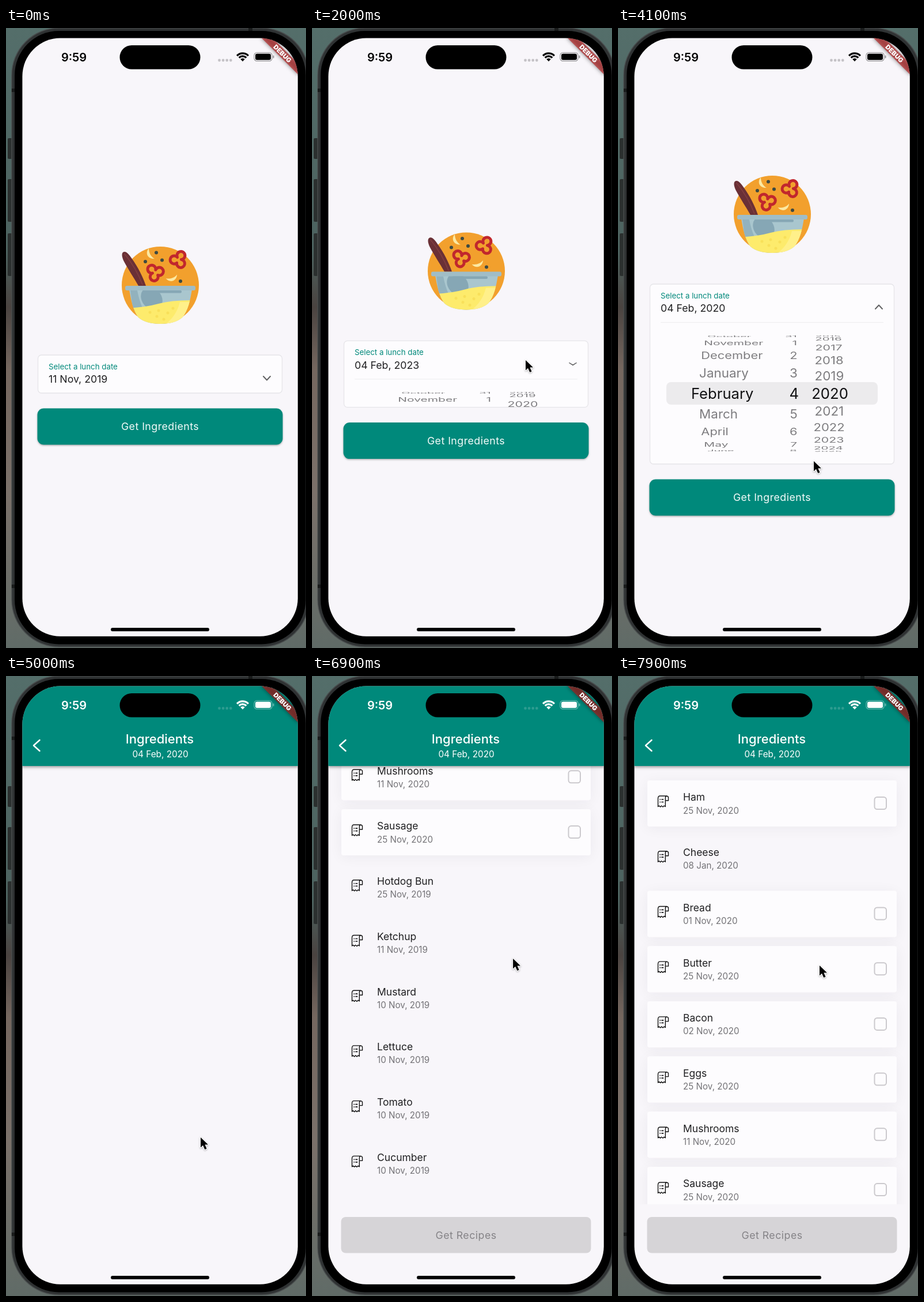
These frames come from a looping animation (521x1075 px, 8 s). An HTML page with a canvas:

```html
<!DOCTYPE html>
<html lang="en">
<head>
<meta charset="utf-8">
<title>Lunch date picker</title>
<style>
html, body { margin: 0; width: 100%; height: 100%; overflow: hidden; background: #5b6b67; }
canvas { display: block; width: 521px; height: 1075px; }
</style>
</head>
<body>
<canvas id="stage"></canvas>
<script>
const W = 521, H = 1075, LOOP = 8000;
const TEAL = '#00897b', PAGE = '#f8f6fa', CARD = '#fdfcfe', INK = '#1f1f21';
const MONTHS = ['January', 'February', 'March', 'April', 'May', 'June', 'July',
  'August', 'September', 'October', 'November', 'December'];
const FOODS = [
  ['Ham', '25 Nov, 2020'], ['Cheese', '08 Jan, 2020'], ['Bread', '01 Nov, 2020'],
  ['Butter', '25 Nov, 2020'], ['Bacon', '02 Nov, 2020'], ['Eggs', '25 Nov, 2020'],
  ['Mushrooms', '11 Nov, 2020'], ['Sausage', '25 Nov, 2020'], ['Hotdog Bun', '25 Nov, 2019'],
  ['Ketchup', '11 Nov, 2019'], ['Mustard', '10 Nov, 2019'], ['Lettuce', '10 Nov, 2019'],
  ['Tomato', '10 Nov, 2019'], ['Cucumber', '10 Nov, 2019'], ['Beetroot', '10 Nov, 2019'],
  ['Salad Dressing', '06 Nov, 2019']
].map(([name, date], i) => ({ name, date, fresh: i !== 1 && i < 8 }));

// [time, value...] points
const FADE = [[0, 0], [100, .5], [300, 1], [800, 1], [1000, 0]];
const EXPAND = [[1900, 0], [2000, .2], [2100, .6], [2200, .9], [2300, 1]];
const YEAR = [[2700, 2023], [2900, 2022.3], [3200, 2020.6], [3500, 2020]];
const SLIDE = [[4400, 0], [4500, .35], [4600, .7], [4700, .88], [4800, .96], [4900, 1]];
const SCROLL = [[6200, 0], [6400, 110], [6700, 480], [6900, 620], [7100, 650],
  [7300, 457], [7500, 170], [7700, 40], [7900, 0]];
const POINTER = [[1600, 530, 760], [1900, 371, 576], [2700, 371, 576], [3200, 350, 690],
  [3600, 344, 705], [4100, 340, 751], [4300, 338, 800], [5200, 338, 800], [6100, 369, 672],
  [6200, 369, 672], [6500, 352, 490], [7050, 348, 490], [7300, 344, 628], [7450, 345, 635],
  [7800, 350, 502]];

const BOWL = 'M214 453H323C320 472 316 490 306 502Q293 513 268 513Q243 513 230 502C221 490 217 472 214 453Z';

const canvas = document.getElementById('stage');
const ctx = canvas.getContext('2d');
const dpr = window.devicePixelRatio || 1;
canvas.width = W * dpr;
canvas.height = H * dpr;

function track(points, t) {
  if (t <= points[0][0]) return points[0].slice(1);
  for (let i = 1; i < points.length; i++) {
    const a = points[i - 1], b = points[i];
    if (t < b[0]) {
      const k = (t - a[0]) / (b[0] - a[0]);
      return a.slice(1).map((v, j) => v + (b[j + 1] - v) * k);
    }
  }
  return points[points.length - 1].slice(1);
}

function layer(draw, x = 0, y = 0) {
  ctx.save();
  ctx.translate(x, y);
  draw();
  ctx.restore();
}

function clipBox(x, y, w, h, r = 0) {
  ctx.beginPath();
  ctx.roundRect(x, y, w, h, r);
  ctx.clip();
}

function box(x, y, w, h, r, fill, stroke, lw = 1) {
  ctx.beginPath();
  ctx.roundRect(x, y, w, h, r);
  if (fill) { ctx.fillStyle = fill; ctx.fill(); }
  if (stroke) { ctx.strokeStyle = stroke; ctx.lineWidth = lw; ctx.stroke(); }
}

function shadowBox(x, y, w, h, r, fill, color, blur, dy) {
  layer(() => {
    ctx.shadowColor = color;
    ctx.shadowBlur = blur * dpr;
    ctx.shadowOffsetY = dy * dpr;
    box(x, y, w, h, r, fill);
  });
}

function dot(x, y, r, fill) {
  oval(x, y, r, r, 0, fill);
}

function oval(x, y, rx, ry, turn, fill) {
  ctx.beginPath();
  ctx.ellipse(x, y, rx, ry, turn, 0, 7);
  ctx.fillStyle = fill;
  ctx.fill();
}

function shape(d, fill, stroke, lw = 1) {
  const p = new Path2D(d);
  if (fill) { ctx.fillStyle = fill; ctx.fill(p); }
  if (stroke) {
    ctx.strokeStyle = stroke;
    ctx.lineWidth = lw;
    ctx.lineCap = ctx.lineJoin = 'round';
    ctx.stroke(p);
  }
}

// y is the middle of the capitals
function text(s, x, y, size, fill, { align = 'left', weight = 400, gap = 0 } = {}) {
  ctx.font = `${weight} ${size}px Inter, sans-serif`;
  ctx.letterSpacing = gap + 'px';
  ctx.textAlign = align;
  ctx.textBaseline = 'alphabetic';
  ctx.fillStyle = fill;
  ctx.fillText(s, x, y + size * .364);
}

function mix(a, b, k) {
  return `rgb(${a.map((v, i) => Math.round(v + (b[i] - v) * k)).join()})`;
}

function phone() {
  const g = ctx.createLinearGradient(0, 0, 0, H);
  [[0, '#546e6a'], [.36, '#4c625f'], [.45, '#4a4340'], [.55, '#75675f'],
    [.75, '#7b716a'], [1, '#606b67']].forEach(s => g.addColorStop(...s));
  ctx.fillStyle = g;
  ctx.fillRect(0, 0, W, H);
  [[191, 36], [262, 74], [356, 74]].forEach(([y, h]) => box(3, y, 9, h, 2, '#2b302f'));
  box(10, 0, 516, 1073, 82, '#2f3233', '#494d4e', 1.5);
  box(15, 5, 505.5, 1063.5, 77, '#000');
  ctx.fillStyle = '#191b1b';
  [105, 965].forEach(y => ctx.fillRect(10, y, 5, 6));
  ctx.fillRect(421, 0, 7, 5);
}

function pepper(x, y, turn) {
  layer(() => {
    ctx.rotate(turn);
    shape('M-4-4A7 7 0 1 1 4-4A7 7 0 1 1 0 5A7 7 0 1 1-4-4Z', null, '#c1272d', 5);
  }, x, y);
}

function moon(x, y, turn) {
  layer(() => {
    ctx.rotate(turn);
    shape('M-3-10C-10-2-5 9 7 8C1 5-3-2-3-10Z', '#fce9a2');
  }, x, y);
}

function bowl() {
  dot(268, 446, 67, '#f2a02d');
  pepper(260, 425, -.8);
  pepper(299, 403, .52);
  moon(251, 392, 0);
  moon(288, 433, -1.4);
  [[261, 389.5], [242, 405], [271, 402.5], [303, 439]].forEach(([x, y]) => dot(x, y, 3, '#3d4a42'));
  shape('M203 389C208 385 214 393 218 399C229 414 238 432 243 447L230 447C222 433 212 418 205 405C202 399 200 392 203 389Z', '#6a3036');
  shape('M206 392C216 404 229 424 237 445', null, '#823e40', 1.5);
  layer(() => {
    ctx.clip(new Path2D(BOWL));
    ctx.fillStyle = '#a9c6ce';
    ctx.fillRect(205, 450, 130, 65);
    shape('M216 455H228Q231 472 237 485H220Z', '#92b2be');
    oval(253, 469, 17, 21, -.7, '#86a7b5');
    shape('M205 486Q240 485 265 478T335 472V515H205Z', '#fdeb6c');
    shape('M302 475H325L300 515H275Q296 500 302 475Z', '#fff08a');
    [[250, 493], [265, 490], [262, 500], [281, 494], [290, 486], [274, 505]]
      .forEach(([x, y]) => dot(x, y, 2.5, '#f8e05a'));
  });
  box(207, 447, 122, 8, 3, '#a0bdc7');
  box(243, 455, 62, 4.5, 2, '#86a7b5');
}

function wheel(label, pos, step, { x, bigX, align, pivot }) {
  const mid = 634, base = Math.round(pos);
  for (const big of [false, true]) {
    ctx.save();
    ctx.beginPath();
    if (!big) ctx.rect(55, 500, 425, 270);
    ctx.rect(84, 614, 367, 39);
    ctx.clip('evenodd');
    for (let i = base - 5; i <= base + 5; i++) {
      const a = (i - pos) * step;
      if (Math.abs(a) > 1.56) continue;
      const c = Math.cos(a), s = 1 - .138 * (1 - c), m = big ? 1.135 : 1;
      layer(() => {
        ctx.scale(s * m, Math.max(c, .08) * m);
        text(label(i), 0, 0, 22.6, big ? '#121214' : '#7d7c7f', { align });
      }, big ? bigX : pivot + (x - pivot) * s, mid + 100 * Math.sin(a) * m);
    }
    ctx.restore();
  }
}

function picker(year) {
  ctx.fillStyle = '#ededef';
  ctx.fillRect(74, 510, 387, 1);
  box(84, 614, 367, 39, 8, '#ecebed');
  wheel(i => MONTHS[(i + 12) % 12], 1, .36, { x: 140, bigX: 127, align: 'left', pivot: 267 });
  wheel(i => String((i + 30) % 31 + 1), 4, .36, { x: 312, bigX: 314, align: 'right', pivot: 300 });
  wheel(String, year, .31, { x: 367, bigX: 368, align: 'center', pivot: 350 });
}

function datePage(t) {
  const [e] = track(EXPAND, t), [off] = track(FADE, t), [year] = track(YEAR, t);
  const top = 567 - 123 * e, tall = 66 + 246 * e, btn = top + tall + 26.5;
  const date = t < 100 ? '11 Nov, 2019' : `04 Feb, ${Math.round(year)}`;
  ctx.fillStyle = PAGE;
  ctx.fillRect(28, 17, 480, 1040);
  layer(bowl, 0, -123 * e);
  box(55.5, top, 424, tall, 6, CARD, mix([230, 229, 233], [240, 239, 242], off), 1.3);
  text('Select a lunch date', 74, top + 20, 13.3, mix([0, 137, 123], [156, 154, 158], off));
  text(date, 74, top + 42, 17.7, mix([31, 31, 33], [117, 116, 120], off));
  layer(() => {
    ctx.scale(1, 1 - 2 * e);
    shape('M-6-3L0 3.5L6-3', null, mix([100, 100, 102], [150, 150, 152], off), 2);
  }, 453, top + 40);
  if (e) layer(() => {
    clipBox(56, top, 423, tall, 6);
    ctx.translate(0, top - 444);
    picker(year);
  });
  shadowBox(54.5, btn, 426, 63, 11, mix([0, 137, 123], [86, 179, 168], off), 'rgba(0,0,0,.3)', 3, 1.5);
  text('Get Ingredients', 267.5, btn + 31.5, 17.8, '#f4fbfa', { align: 'center', gap: .45 });
}

function receipt() {
  shape('M4 0H15.5Q18.5 .5 18.5 3V8H13.3M16 0Q13.3 .5 13.3 3V18.5L11 17L9 19L6.5 17L4.5 19L2.5 17L.5 18.5V4Q.5 0 4 0Z', null, '#111', 1.4);
  shape('M4 6H4.2M7 6H9.5M4 10.5H4.2M7 10.5H9.5', null, '#111', 1.7);
}

function list(scroll) {
  clipBox(28, 156, 480, 760);
  const rows = FOODS.map((food, i) => ({ ...food, y: 181 + 95.72 * i - scroll }))
    .filter(r => r.y > 40 && r.y < 960);
  const cards = rows.filter(r => r.fresh);
  cards.forEach(r => shadowBox(51, r.y, 433, 80, 4, CARD, 'rgba(30,40,50,.055)', 24, 3));
  cards.forEach(r => {
    box(51, r.y, 433, 80, 4, CARD);
    box(445.5, r.y + 29, 20.5, 21, 4.5, null, '#cbc9cd', 2);
  });
  rows.forEach(r => {
    layer(receipt, 69, r.y + 27);
    text(r.name, 113, r.y + 29, 17.5, INK);
    text(r.date, 113, r.y + 52, 15.2, '#737276');
  });
}

function listPage(t) {
  ctx.fillStyle = PAGE;
  ctx.fillRect(28, 17, 480, 1040);
  if (t >= 5400) {
    layer(() => list(track(SCROLL, t)[0]));
    box(50.5, 938, 434, 62.5, 8, '#d6d4d7');
    text('Get Recipes', 267.5, 970, 17.8, '#858387', { align: 'center', gap: .45 });
  }
  shadowBox(28, 17, 480, 139, 0, TEAL, 'rgba(0,0,0,.4)', 5, 2);
  shape('M58.5 111L48 120.5L58.5 130', null, '#fff', 2.5);
  text('Ingredients', 267, 109, 22, '#fff', { align: 'center', weight: 500 });
  text('04 Feb, 2020', 268, 135, 15.3, '#fff', { align: 'center' });
}

function statusBar(light) {
  const ink = light ? '#fff' : '#000';
  text('9:59', 118, 51, 20, ink, { align: 'center', weight: 600 });
  box(197.5, 30, 140, 41.5, 20.7, '#000');
  for (let i = 0; i < 4; i++) dot(370.5 + 6.6 * i, 56, 2.4, light ? '#2d9c90' : '#c5c3c7');
  ctx.strokeStyle = ink;
  ctx.lineCap = 'butt';
  ctx.lineWidth = 3.2;
  for (const r of [13.6, 8.6]) {
    ctx.beginPath();
    ctx.arc(411, 57.5, r, -Math.PI * .76, -Math.PI * .24);
    ctx.stroke();
  }
  shape('M411 58L407.2 54Q411 51 414.8 54Z', ink);
  ctx.globalAlpha = .4;
  box(431, 42.5, 31, 15, 5, null, ink, 1.2);
  box(463.5, 47.5, 2, 5, 1, ink);
  ctx.globalAlpha = 1;
  box(433, 44.5, 27, 11, 3.2, ink);
}

function ribbon() {
  layer(() => {
    ctx.rotate(Math.PI / 4);
    ctx.save();
    ctx.shadowColor = 'rgba(0,0,0,.5)';
    ctx.shadowBlur = 7 * dpr;
    ctx.shadowOffsetX = 1000 * dpr;
    const shift = 1000 * Math.SQRT1_2;
    ctx.fillRect(-45 - shift, 31.2 + shift, 90, 13.4);
    ctx.restore();
    ctx.fillStyle = 'rgba(183,28,28,.627)';
    ctx.fillRect(-45, 31.2, 90, 13.4);
    text('DEBUG', 0, 37.9, 11.2, '#fff', { align: 'center', weight: 900 });
  }, 507, 17.5);
}

function arrow(x, y) {
  layer(() => {
    ctx.shadowColor = 'rgba(0,0,0,.3)';
    ctx.shadowBlur = 3 * dpr;
    ctx.shadowOffsetY = dpr;
    const d = 'M0 0V17.5L4 13.8L7.3 21L10.6 19.5L7.4 12.6H13Z';
    shape(d, null, '#fff', 2.4);
    ctx.shadowColor = 'transparent';
    shape(d, '#000');
  }, x, y);
}

function draw(t) {
  ctx.setTransform(dpr, 0, 0, dpr, 0, 0);
  phone();
  const [slide] = track(SLIDE, t);
  layer(() => {
    clipBox(28.4, 17.6, 478.4, 1037.2, 66);
    if (slide < 1) layer(() => datePage(t), -160 * slide);
    if (slide > 0) layer(() => listPage(t), 479 * (1 - slide));
    statusBar(slide > .5);
    ribbon();
    box(182, 1040, 171, 6, 3, '#000');
  });
  if (t >= 1600) arrow(...track(POINTER, t));
}

function frame() {
  const t = performance.now() % LOOP;
  draw(Math.floor(t / 100) * 100);
  requestAnimationFrame(frame);
}
frame();
</script>
</body>
</html>
```
